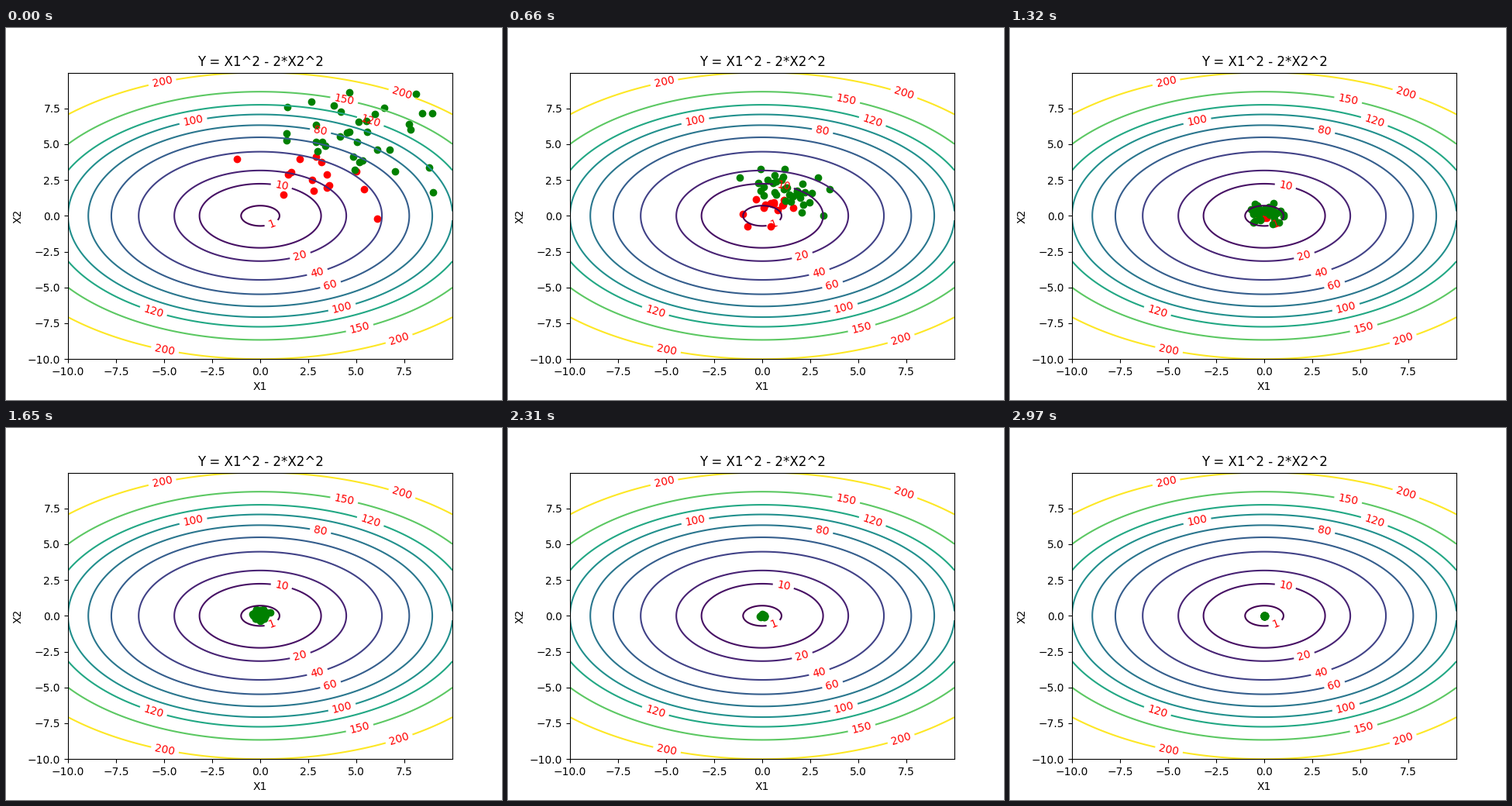
Recreate the animation shown at these times as a matplotlib script. Size 640x480 px, loop 3300 ms.

```python
import numpy as np
import matplotlib.pyplot as plt
from matplotlib.animation import FuncAnimation

FRAMES, INTERVAL = 10, 330
POPULATION, ELITE = 50, 15
LEVELS = [1, 10, 20, 40, 60, 80, 100, 120, 150, 200]
START_CENTRE = np.array([3.9, 4.2])
START_REACH = np.array([5.1, 4.4])


def cost(x, y):
    return x**2 + 2 * y**2


def generation(number):
    """Return the swarm of one generation, cheapest points first."""
    centre = START_CENTRE * np.exp(-0.4 * number - 0.1 * number**2)
    reach = START_REACH * np.exp(-0.33 * number - 0.03 * number**2)
    swarm = np.random.default_rng(number).normal(size=(POPULATION, 2))
    # Scale the cloud so that it just spans -1 to 1 on both axes.
    swarm = 2 * (swarm - swarm.min(axis=0)) / np.ptp(swarm, axis=0) - 1
    swarm = centre + reach * swarm
    return swarm[np.argsort(cost(*swarm.T))]


fig, ax = plt.subplots(figsize=(6.4, 4.8), dpi=100)
axis = np.arange(-10, 10, 0.01)
x_grid, y_grid = np.meshgrid(axis, axis)
contours = ax.contour(x_grid, y_grid, cost(x_grid, y_grid), LEVELS)
ax.set(xlim=(axis[0], axis[-1]), ylim=(axis[0], axis[-1]),
       xlabel="X1", ylabel="X2", title="Y = X1^2 - 2*X2^2")
ax.clabel(contours, colors="red", fontsize=10, fmt="%d")

elite = ax.scatter([], [], color="red")
others = ax.scatter([], [], color="green")


def update(number):
    swarm = generation(number)
    elite.set_offsets(swarm[:ELITE])
    others.set_offsets(swarm[ELITE:])
    return elite, others


animation = FuncAnimation(fig, update, frames=FRAMES, interval=INTERVAL,
                          repeat=True, repeat_delay=0)
plt.show()
```
